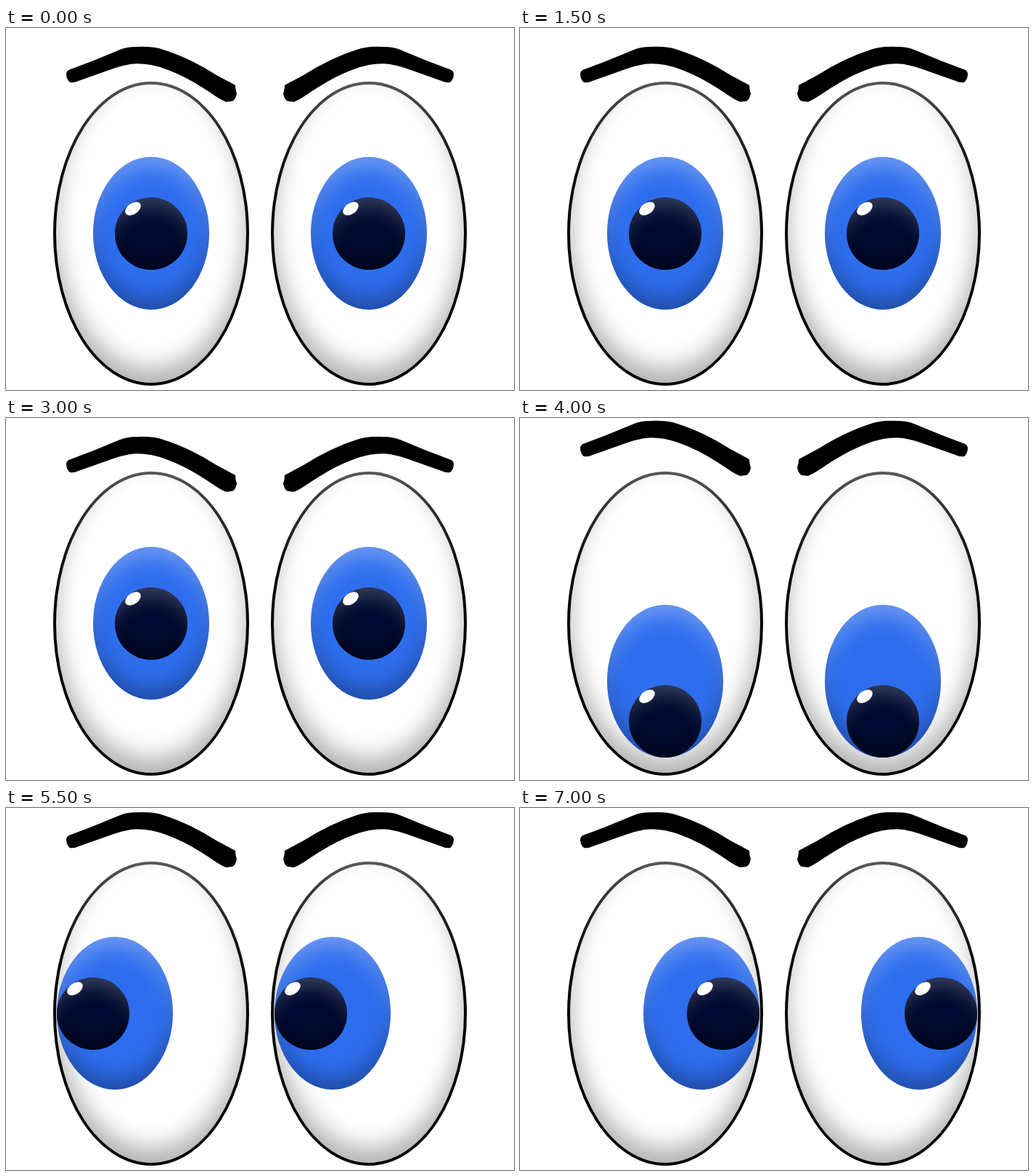
An HTML page that plays this animation: 700x500 px, repeating every 7500 ms.

```html
<!DOCTYPE html>
<html lang="en">
<head>
<meta charset="utf-8">
<title>Looking around</title>
<style>
html, body { margin: 0; width: 100%; height: 100%; overflow: hidden; background: #fff; }
#stage { position: relative; width: 700px; height: 500px; overflow: hidden; }
#stage div { position: absolute; border-radius: 50%; }
.eye { top: 74px; width: 270px; height: 420px; background: linear-gradient(#585858, #303030 12%, #101010 28%, #000 45%); }
.white { inset: 4px; background: #fff; box-shadow: inset 0 -20px 32px rgba(0,0,0,.3); }
.iris {
  left: 55px; top: 104px; width: 160px; height: 211px; background: #2e6eee;
  box-shadow: inset 0 -22px 30px -8px rgba(0,0,0,.32), inset 0 25px 30px -12px rgba(255,255,255,.32);
}
.pupil {
  left: 85px; top: 160px; width: 100px; height: 100px; background: #000a30;
  box-shadow: inset 0 -14px 22px -6px rgba(0,0,0,.5), inset 0 22px 24px -10px rgba(255,255,255,.22);
}
.glint { left: 13px; top: 7.5px; width: 24px; height: 15px; background: #fff; transform: rotate(-35deg); }
svg { position: absolute; left: 0; top: 0; }
</style>
</head>
<body>
<div id="stage" style="border-radius:0">
  <svg width="700" height="500">
    <g id="brows">
      <path id="brow" d="M83 63Q84 58 89 57L118 46L157 30Q166 26 180 26Q203 25 217 30Q252 41 290 65L316 79Q316 85 318 91Q316 99 312 101L303 102Q296 99 290 95Q265 78 246 68Q220 55 200 51Q183 48 171 50Q160 52 148 56L100 73Q94 76 88 75Q83 71 83 63Z"/>
      <use href="#brow" transform="translate(700) scale(-1 1)"/>
    </g>
  </svg>
</div>
<script>
const stage = document.getElementById('stage');
const brows = document.getElementById('brows');

function add(parent, name) {
  const el = document.createElement('div');
  el.className = name;
  return parent.appendChild(el);
}

const eyes = [65, 365].map(x => {
  const eye = add(stage, 'eye');
  eye.style.left = x + 'px';
  add(eye, 'white');
  const iris = add(eye, 'iris'), pupil = add(eye, 'pupil');
  add(pupil, 'glint');
  return { iris, pupil };
});

// Offsets as [x, y]; each list holds the left and the right eye
const both = (x, y) => [[x, y], [x, y]];
const ahead = { brow: 0, iris: both(0, 0), pupil: both(0, 0) };
const down = { brow: -22, iris: both(0, 80), pupil: both(0, 135) };
const up = { brow: -20, iris: [[1, -99], [0, -99]], pupil: [[0, -155], [0, -154]] };
const left = { brow: -20, iris: both(-50, 0), pupil: both(-80, 0) };
const right = { brow: -20, iris: both(50, 0), pupil: both(80, 0) };

// Each glance follows a second of looking ahead
const glances = [down, up, down, left, right];

const move = (el, [x, y]) => el.style.transform = `translate(${x}px, ${y}px)`;

function draw(now) {
  const t = now % 7500;
  const pose = t % 1500 < 1000 ? ahead : glances[Math.floor(t / 1500)];
  eyes.forEach((eye, i) => {
    move(eye.iris, pose.iris[i]);
    move(eye.pupil, pose.pupil[i]);
  });
  brows.setAttribute('transform', `translate(0 ${pose.brow})`);
}

const start = performance.now();
function tick() {
  draw(performance.now() - start);
  requestAnimationFrame(tick);
}
tick();
</script>
</body>
</html>
```
